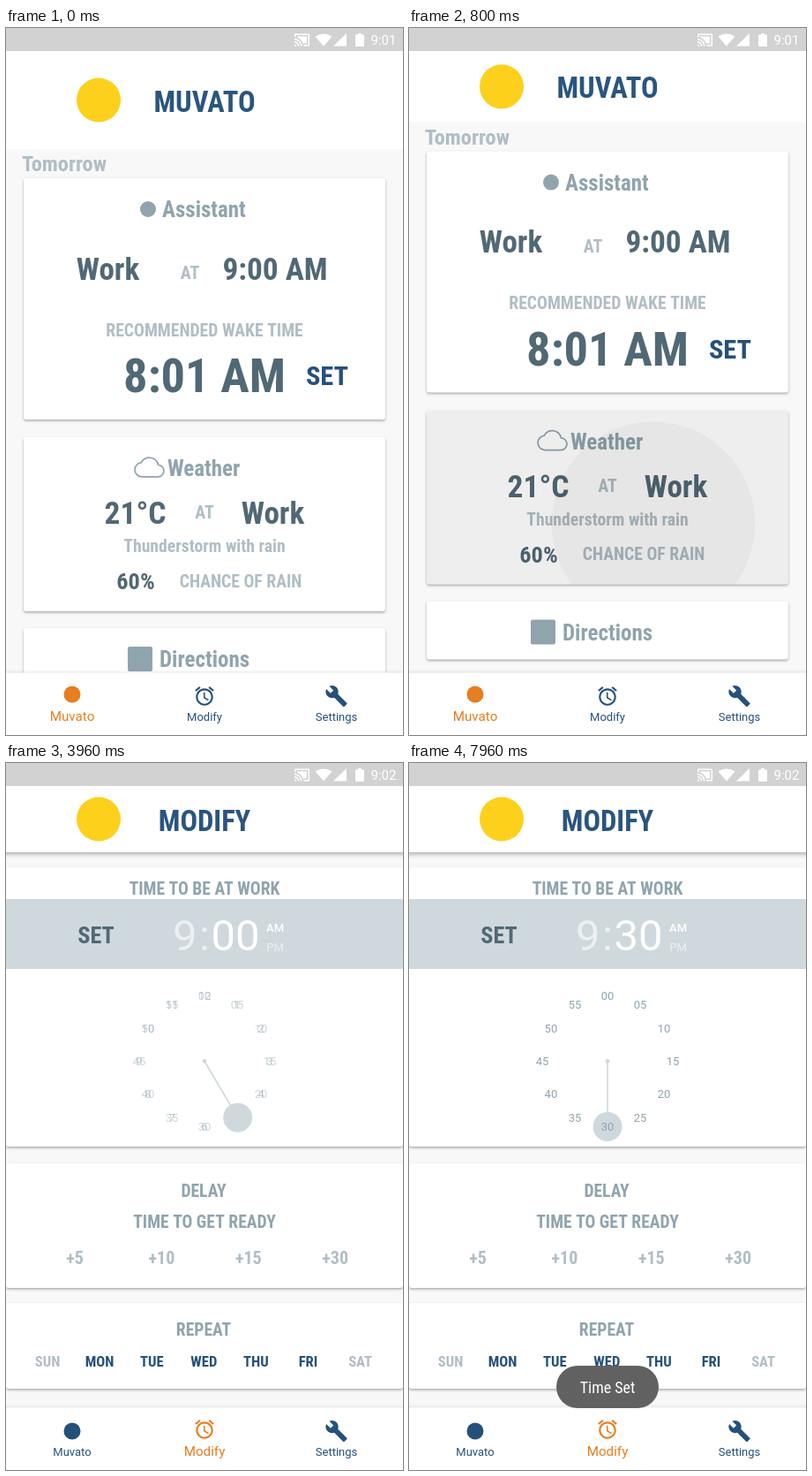
An HTML page with a canvas for the animation above (8000 ms loop, 450 by 800 pixels).

```html
<!DOCTYPE html>
<html lang="en">
<head>
<meta charset="utf-8">
<title>Alarm assistant</title>
<style>
html, body { margin: 0; width: 100%; height: 100%; overflow: hidden; background: #f8f8f8; }
canvas { display: block; }
</style>
</head>
<body>
<canvas id="stage" width="450" height="800"></canvas>
<script>
const ctx = document.getElementById('stage').getContext('2d');
const LOOP = 8000;
const NAVY = '#26507a', SLATE = '#516875', MID = '#90a4ae', PALE = '#b0bec5',
      BAND = '#cfd8dc', ORANGE = '#e67e22', DIM = 'rgba(255,255,255,.62)';
const APP = 'Muvato';

// Moments of the story, in ms
const SWITCH_PAGE = 2600, CLOCK_TICK = 3640, TO_MINUTES = 3728, PICK_MINUTE = 5080, TOAST = 7520;

const ICONS = {
  alarm: 'M22 5.72l-4.6-3.86-1.29 1.53 4.6 3.86L22 5.72zM7.88 3.39L6.6 1.86 2 5.71l1.29 1.53 4.59-3.85zM12.5 8H11v6l4.75 2.85.75-1.23-4-2.37V8zM12 4c-4.97 0-9 4.03-9 9s4.02 9 9 9c4.97 0 9-4.03 9-9s-4.03-9-9-9zm0 16c-3.87 0-7-3.13-7-7s3.13-7 7-7 7 3.13 7 7-3.13 7-7 7z',
  wrench: 'M22.7 19l-9.1-9.1c.9-2.3.4-5-1.5-6.9-2-2-5-2.4-7.4-1.3L9 6 6 9 1.6 4.7C.4 7.1.9 10.1 2.9 12.1c1.9 1.9 4.6 2.4 6.9 1.5l9.1 9.1c.4.4 1 .4 1.4 0l2.3-2.3c.5-.4.5-1.1.1-1.4z',
  cast: 'M21 3H3c-1.1 0-2 .9-2 2v3h2V5h18v14h-7v2h7c1.1 0 2-.9 2-2V5c0-1.1-.9-2-2-2zM1 18v3h3c0-1.66-1.34-3-3-3zm0-4v2c2.76 0 5 2.24 5 5h2c0-3.87-3.13-7-7-7zm0-4v2c4.97 0 9 4.03 9 9h2c0-6.08-4.93-11-11-11zM19 7H5v1.63c3.96 1.28 7.09 4.41 8.37 8.37H19V7z',
  cloud: 'M19.35 10.04C18.67 6.59 15.64 4 12 4 9.11 4 6.6 5.64 5.35 8.04 2.34 8.36 0 10.91 0 14c0 3.31 2.69 6 6 6h13c2.76 0 5-2.24 5-5 0-2.64-2.05-4.78-4.65-4.96z'
};
for (const name in ICONS) ICONS[name] = new Path2D(ICONS[name]);

const ramp = (t, from, to) => Math.min(1, Math.max(0, (t - from) / (to - from)));
const smooth = (t, from, to) => { const u = ramp(t, from, to); return u * u * (3 - 2 * u); };
const easeOut = u => 1 - (1 - u) ** 2;

const regular = (size, weight = 400) => `${weight} ${size}px Roboto, sans-serif`;
const narrow = (size, weight = 700) =>
  `${weight} condensed ${size}px "Roboto Condensed", Roboto, sans-serif`;
const widthIn = font => { ctx.font = font; return ctx.measureText('Thunderstorm 8:01 AM').width; };
// Without a condensed face, regular Roboto is narrowed by one constant.
const squeeze = widthIn(narrow(40)) < widthIn(regular(40, 700)) * .96 ? 1 : .885;

function drawText(text, x, y, font, color, align, scaleX) {
  ctx.save();
  ctx.translate(x, y);
  ctx.scale(scaleX, 1);
  ctx.font = font;
  ctx.fillStyle = color;
  ctx.textAlign = align;
  ctx.fillText(text, 0, 0);
  ctx.restore();
}
const label = (text, x, y, size, color = PALE, align = 'center', weight = 700) =>
  drawText(text, x, y, narrow(size, weight), color, align, squeeze);
const plain = (text, x, y, size, color, align = 'center', weight = 400) =>
  drawText(text, x, y, regular(size, weight), color, align, 1);

function rect(x, y, w, h, color, radius = 0) {
  ctx.fillStyle = color;
  ctx.beginPath();
  ctx.roundRect(x, y, w, h, radius);
  ctx.fill();
}
function disc(x, y, r, color) {
  ctx.fillStyle = color;
  ctx.beginPath();
  ctx.arc(x, y, r, 0, 2 * Math.PI);
  ctx.fill();
}
function polygon(color, ...points) {
  ctx.fillStyle = color;
  ctx.beginPath();
  points.forEach(([x, y]) => ctx.lineTo(x, y));
  ctx.fill();
}
function icon(name, x, y, scale, color, outline) {
  ctx.save();
  ctx.translate(x, y);
  ctx.scale(scale, scale);
  ctx.translate(-12, -12);
  ctx.fillStyle = ctx.strokeStyle = color;
  ctx.lineWidth = outline || 0;
  if (outline) ctx.stroke(ICONS[name]); else ctx.fill(ICONS[name]);
  ctx.restore();
}
function shadowed(alpha, blur, dy, draw) {
  ctx.save();
  ctx.shadowColor = `rgba(0,0,0,${alpha})`;
  ctx.shadowBlur = blur;
  ctx.shadowOffsetY = dy;
  draw();
  ctx.restore();
}
const card = (x, y, w, h) => shadowed(.32, 3, 1.5, () => rect(x, y, w, h, '#fff', 3));

function weatherPress(t) {
  const strength = smooth(t, 360, 560) * (1 - smooth(t, 760, 1300));
  if (!strength) return;
  ctx.save();
  ctx.beginPath();
  ctx.roundRect(20, 463, 410, 197, 3);
  ctx.clip();
  rect(20, 463, 410, 197, `rgba(0,0,0,${.067 * strength})`);
  disc(277, 591, 85 * ramp(t, 380, 680) + 130 * ramp(t, 680, 1200), `rgba(0,0,0,${.035 * strength})`);
  ctx.restore();
}

function homePage(t, scroll) {
  ctx.save();
  ctx.translate(0, -scroll);
  label('Tomorrow', 18, 162, 24.3, PALE, 'left');

  card(20, 170, 410, 273);
  disc(161, 205, 9, MID);
  label('Assistant', 177, 214, 25, MID, 'left');
  label('Work', 115.5, 284.5, 35, SLATE);
  label('AT', 208.5, 284, 20);
  label('9:00 AM', 305, 284.5, 35.3, SLATE);
  label('RECOMMENDED WAKE TIME', 225, 348.5, 19.7);
  label('8:01 AM', 225, 412, 54.4, SLATE);
  label('SET', 364, 404.3, 30.4, NAVY);

  card(20, 463, 410, 197);
  icon('cloud', 162.5, 497, 1.37, MID, 1.25);
  label('Weather', 183, 507, 25, MID, 'left');
  label('21°C', 146.5, 561, 35.5, SLATE);
  label('AT', 225, 555, 20);
  label('Work', 302.5, 561, 35, SLATE);
  label('Thunderstorm with rain', 225, 593, 19.7);
  label('60%', 147, 635, 26.3, SLATE);
  label('CHANCE OF RAIN', 266, 632.5, 19.7);
  weatherPress(t);

  card(20, 679, 410, 66);
  rect(138, 700, 28, 28, MID, 2);
  label('Directions', 174, 723, 25, MID, 'left');
  ctx.restore();
}

const DIAL = { x: 225, y: 337.5, r: 74 };
function dialPoint(degrees) {
  const a = degrees * Math.PI / 180;
  return [DIAL.x + DIAL.r * Math.sin(a), DIAL.y - DIAL.r * Math.cos(a)];
}
function dialNumber(i, minutes) {
  const [x, y] = dialPoint(i * 30);
  const text = minutes ? String(i * 5).padStart(2, '0') : String(i || 12);
  plain(text, x, y + 4.7, 13, MID);
}

function dial(t, minute) {
  const blend = (1 - Math.cos(Math.PI * ramp(t, TO_MINUTES, TO_MINUTES + 500))) / 2;
  const faces = [[false, 1 - blend, 9], [true, blend, minute / 5]];
  const [x, y] = dialPoint(minute ? minute * 6 : 270 * (1 - blend));

  ctx.save();
  for (const [minutes, alpha] of faces) {
    ctx.globalAlpha = alpha;
    for (let i = 0; i < 12; i++) dialNumber(i, minutes);
  }
  ctx.globalAlpha = 1;
  ctx.strokeStyle = BAND;
  ctx.lineWidth = 1.6;
  ctx.beginPath();
  ctx.moveTo(DIAL.x, DIAL.y);
  ctx.lineTo(x, y);
  ctx.stroke();
  disc(DIAL.x, DIAL.y, 2.4, BAND);
  disc(x, y, 16.5, BAND);
  // The chosen number shows only inside the hand's disc.
  ctx.clip();
  for (const [minutes, alpha, chosen] of faces) {
    ctx.globalAlpha = alpha;
    dialNumber(chosen, minutes);
  }
  ctx.restore();
}

function modifyPage(t) {
  const onMinutes = t >= TO_MINUTES;
  const minute = t >= PICK_MINUTE ? 30 : 0;

  card(0, 118, 450, 316);
  label('TIME TO BE AT WORK', 225, 149, 19.6, MID);
  rect(0, 154, 450, 79, BAND);
  label('SET', 102, 204.3, 26.2, SLATE);
  plain('9', 189, 212, 49, onMinutes ? DIM : '#fff', 'left');
  plain(':', 225, 212, 49, DIM);
  plain(minute || '00', 232.5, 212, 49, onMinutes ? '#fff' : DIM, 'left');
  plain('AM', 305, 190.5, 13, '#fff', 'center', 500);
  plain('PM', 305, 213, 13, DIM);
  dial(t, minute);

  card(0, 453, 450, 141);
  label('DELAY', 224, 490.5, 19.6, MID);
  label('TIME TO GET READY', 225, 525.5, 19.6, MID);
  ['+5', '+10', '+15', '+30'].forEach((text, i) => label(text, 78 + i * 98.4, 567, 20));

  card(0, 611, 450, 97);
  label('REPEAT', 224, 648, 19.6, MID);
  ['SUN', 'MON', 'TUE', 'WED', 'THU', 'FRI', 'SAT'].forEach((day, i) =>
    label(day, 47 + i * 59.1, 682.7, 16.6, i % 6 ? NAVY : PALE));

  card(0, 728, 450, 80);
}

function header(title, scroll) {
  const bottom = 137 - scroll;
  shadowed(.32 * ramp(scroll, 32, 36), 5, 2, () => rect(-5, 20, 460, bottom - 20, '#fff'));
  disc(105, 81.5 - scroll / 2, 25, '#fdd01c');
  label(title, 225, 94.5 - scroll / 2, 32.5, '#2a5580');
}

function statusBar(t) {
  rect(0, 0, 450, 26, '#d2d2d2');
  icon('cast', 335.5, 13.5, .78, '#fff');
  ctx.fillStyle = '#fff';
  ctx.beginPath();
  ctx.moveTo(360, 20.5);
  ctx.lineTo(350.5, 9.5);
  ctx.quadraticCurveTo(360, 3.5, 369.5, 9.5);
  ctx.fill();
  polygon('#fff', [371, 20.5], [386, 20.5], [386, 6]);
  rect(396, 7.5, 10, 13.5, '#fff', 1);
  rect(399, 6, 4, 2, '#fff');
  plain(t >= CLOCK_TICK ? '9:02' : '9:01', 428, 19, 15, '#fff');
}

function navRipple(t) {
  const alpha = .09 * (1 - smooth(t, 2760, 3120));
  if (t < 2560 || !alpha) return;
  ctx.save();
  ctx.beginPath();
  ctx.rect(150, 730, 150, 70);
  ctx.clip();
  disc(231, 768, 60 * easeOut(ramp(t, 2560, 3090)), `rgba(0,0,0,${alpha})`);
  ctx.restore();
}

function bottomNav(t) {
  shadowed(.15, 3, -.5, () => rect(-5, 729.5, 460, 80, '#fff'));
  navRipple(t);
  const moved = smooth(t, SWITCH_PAGE + 10, SWITCH_PAGE + 190);
  const switched = t >= SWITCH_PAGE;
  const items = [
    [APP, 75, 1 - moved, !switched, (x, y, c) => disc(x, y, 9.5, c)],
    ['Modify', 225, moved, switched, (x, y, c) => icon('alarm', x, y, 1.08, c)],
    ['Settings', 374.5, 0, false, (x, y, c) => icon('wrench', x, y, 1.1, c)]
  ];
  for (const [text, x, active, lit, drawIcon] of items) {
    const color = lit ? ORANGE : NAVY;
    drawIcon(x, 756 - 2 * active, color);
    plain(text, x, 784.3, 13 + 2.2 * active, color);
  }
}

function toast(t) {
  ctx.save();
  ctx.globalAlpha = easeOut(ramp(t, TOAST, TOAST + 400));
  rect(167, 682, 116, 48, '#616161', 24);
  label('Time Set', 225, 713, 18, '#fff', 'center', 400);
  ctx.restore();
}

function draw(t) {
  const onHome = t < SWITCH_PAGE;
  const scroll = 36 * smooth(t, 200, 1000);
  rect(0, 0, 450, 800, '#f8f8f8');
  if (onHome) homePage(t, scroll); else modifyPage(t);
  header(onHome ? APP.toUpperCase() : 'MODIFY', scroll);
  statusBar(t);
  bottomNav(t);
  toast(t);
}

const start = performance.now();
function frame() {
  draw((performance.now() - start) % LOOP);
  requestAnimationFrame(frame);
}
frame();
</script>
</body>
</html>
```
